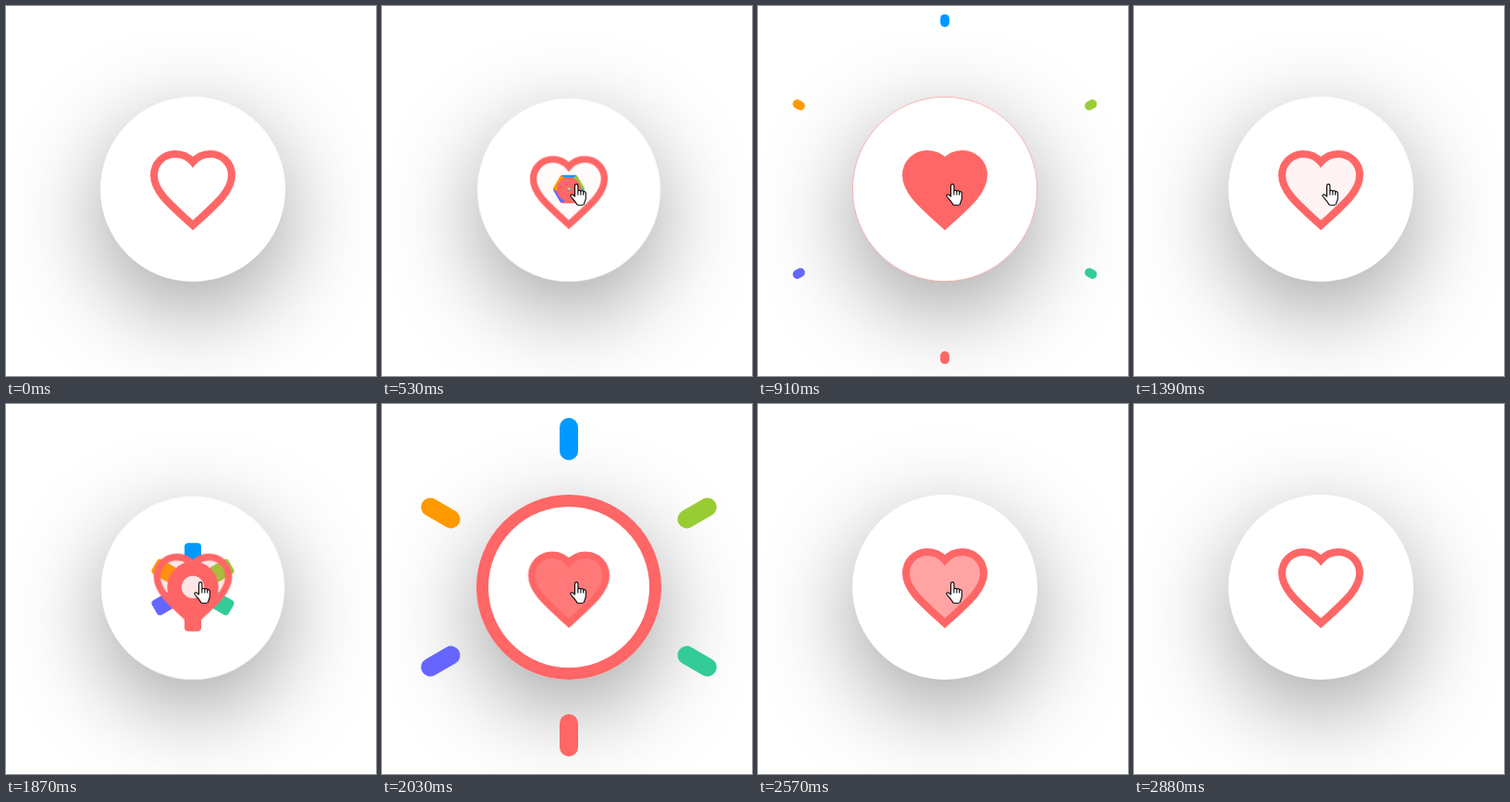
An HTML page without scripts for the animation above (3.43 s loop, 400 by 400 pixels).

```html
<!DOCTYPE html>
<html lang="en">
<head>
<meta charset="utf-8">
<title>Like button</title>
<style>
  html, body { margin: 0; width: 100%; height: 100%; overflow: hidden; background: #fff; }
  .stage { position: relative; width: 400px; height: 400px; overflow: hidden; }
  svg { position: absolute; inset: 0; }
  .button, .heart, .fill, .ring, .bars rect, .cursor, .arrow, .hand {
    animation: 3430ms linear infinite;
  }
  .button {
    position: absolute; left: 102px; top: 98px; width: 200px; height: 200px;
    border-radius: 50%; background: #fff;
    box-shadow: 0 30px 100px rgba(0, 0, 0, .38);
    animation-name: press;
  }
  .heart { transform-origin: 202px 199px; animation-name: beat; }
  .fill { fill: #f66; animation-name: fill; }
  .line { fill: none; stroke: #f66; stroke-width: 1.905; stroke-miterlimit: 10; }
  .ring { fill: none; stroke: #f66; animation-name: ring; }
  .bars rect { animation-name: burst; }
  .cursor { animation-name: move; }
  .hand, .arrow { fill: #fff; stroke: #000; stroke-width: 1.1; stroke-linejoin: round; }
  .hand { animation-name: hand; }
  .arrow { animation-name: arrow; }

  /* The click plays twice, 1310 ms apart, so most stops come in pairs. */
  @keyframes press {
    0%, 11.66%, 20.99%, 49.85%, 59.18%, 100% { transform: translate(0, 0) scale(1); }
    15.45%, 53.64% { transform: translate(0, 1px) scale(.99); }
  }
  @keyframes beat {
    0%, 11.66%, 26.53%, 49.85%, 64.72%, 100% { transform: translate(0, 0) scale(1); }
    15.45%, 53.64% { transform: translate(0, 2.5px) scale(.915); }
    20.99%, 59.18% { transform: translate(0, 1.5px) scale(.957); }
  }
  @keyframes fill {
    0%, 15.3%, 49.85%, 53.5%, 79.3%, 100% { fill-opacity: 0; }
    21.87%, 33.82%, 60.06%, 72.01% { fill-opacity: 1; }
    40.52%, 49.84% { fill-opacity: .08; }
  }
  @keyframes ring {
    0%, 14.66%, 52.86%, 100% { r: 0px; stroke-width: 0; }
    15.45%, 53.64% { r: 7.25px; stroke-width: 10.5px; }
    18.08%, 56.27% { r: 44px; stroke-width: 25px; }
    20.99%, 59.18% { r: 93.5px; stroke-width: 13px; }
    26.53%, 64.72% { r: 99.7px; stroke-width: .5px; }
    27.99%, 66.18% { r: 100px; stroke-width: 0; }
  }
  @keyframes burst {
    0%, 14.66%, 52.86%, 100% { x: -8.5px; y: 0px; width: 17px; height: 0px; rx: 1px; }
    15.45%, 53.64% { x: -8.5px; y: -14px; width: 17px; height: 14px; rx: 1px; }
    18.08%, 56.27% { x: -10px; y: -112px; width: 20px; height: 42px; rx: 10px; }
    20.99%, 59.18% { x: -10px; y: -183px; width: 20px; height: 46px; rx: 10px; }
    26.53%, 64.72% { x: -5px; y: -189px; width: 10px; height: 14px; rx: 5px; }
    27.99%, 66.18% { x: 0px; y: -193px; width: 0px; height: 0px; rx: 0px; }
  }
  @keyframes move {
    0% { transform: translate(147px, 106px); visibility: hidden; animation-timing-function: step-end; }
    2.04% { transform: translate(147px, 106px); visibility: visible; animation-timing-function: ease-out; }
    11.66%, 79.4% { transform: translate(0, 0); visibility: visible; }
    81.9% { transform: translate(15px, 16px); visibility: visible; animation-timing-function: step-end; }
    83.95%, 100% { transform: translate(15px, 16px); visibility: hidden; }
  }
  @keyframes hand {
    0%, 5.3% { opacity: 0; }
    5.31%, 100% { opacity: 1; }
  }
  @keyframes arrow {
    0%, 5.3% { opacity: 1; }
    5.31%, 100% { opacity: 0; }
  }
</style>
</head>
<body>
<div class="stage">
  <div class="button"></div>
  <svg width="400" height="400" viewBox="0 0 400 400">
    <defs>
      <path id="heart" d="M12 21.35l-1.45-1.32C5.4 15.36 2 12.28 2 8.5 2 5.42 4.42 3 7.5 3c1.74 0 3.41.81 4.5 2.09C13.09 3.81 14.76 3 16.5 3 19.58 3 22 5.42 22 8.5c0 3.78-3.4 6.86-8.55 11.54z"/>
    </defs>

    <g transform="translate(202 198)">
      <g class="bars">
        <rect fill="#09f"/>
        <rect fill="#9c3" transform="rotate(60)"/>
        <rect fill="#3c9" transform="rotate(120)"/>
        <rect fill="#f66" transform="rotate(180)"/>
        <rect fill="#66f" transform="rotate(240)"/>
        <rect fill="#f90" transform="rotate(300)"/>
      </g>
      <circle class="ring"/>
    </g>

    <g class="heart">
      <g transform="translate(151.6 147.4) scale(4.2)">
        <use class="fill" href="#heart"/>
        <use class="line" href="#heart"/>
      </g>
    </g>

    <g class="cursor">
      <path class="arrow" d="M210 192v16l3.7-3.5 2.7 6.2 2.6-1.1-2.7-6.1h5.2z"/>
      <g class="hand">
        <path transform="translate(203 192)" d="M5.5 14V2.3a1.7 1.7 0 0 1 3.4 0V8.6a1.5 1.5 0 0 1 3 .2a1.4 1.4 0 0 1 2.8 .6a1.4 1.4 0 0 1 2.6 .9V16c0 2-1.3 3.5-1.6 5.2q-.2 2-2 2H9q-1.3 0-2-2C5.5 18.5 2.5 16 1 13.5C.5 12 2.2 11.2 3.5 12.2zM8.9 8.6v4M11.9 8.8v3.8M14.7 9.4v3.2"/>
      </g>
    </g>
  </svg>
</div>
</body>
</html>
```
